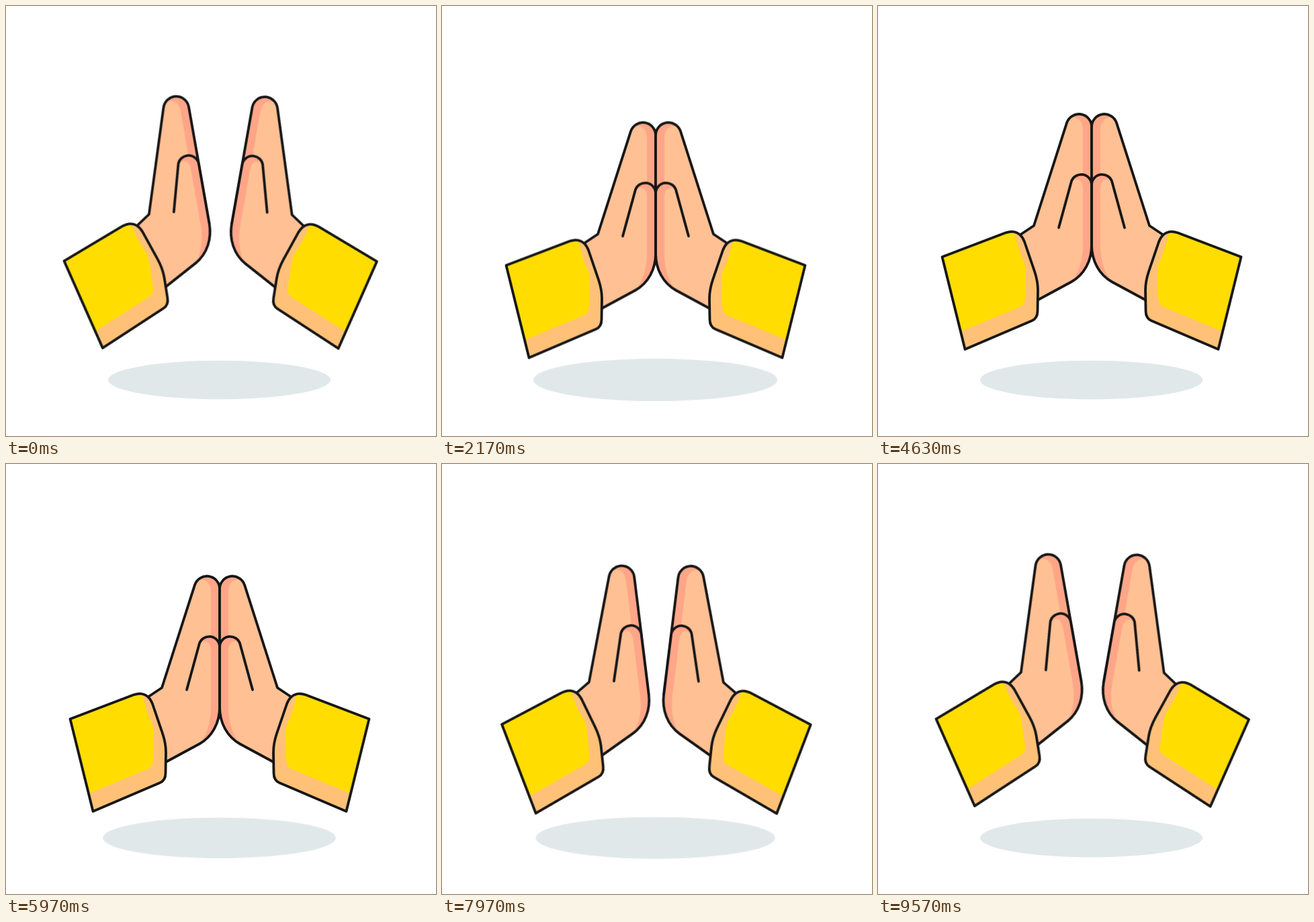
Write an HTML page without scripts that moves like this. It is 640 px wide and 640 px high and loops after 9610 ms.

```html
<!DOCTYPE html>
<html lang="en">
<head>
<meta charset="utf-8">
<title>Praying hands</title>
<style>
  html, body { margin: 0; width: 100%; height: 100%; overflow: hidden; background: #fff; }
  svg { display: block; width: 100%; height: 100%; }

  .skin { fill: #ffc094; }
  .blush { fill: #ffa688; }
  .cuff { fill: #ffc178; }
  .cloth { fill: #ffdd00; }
  .shadow { fill: #e1e8ea; }
  .line { fill: none; stroke: #161616; stroke-width: 3.8; stroke-linecap: round; stroke-linejoin: round; }

  /* Floating: one rise or fall is a quarter of the loop */
  .bob, .shadow { animation: bob 2.4025s cubic-bezier(.35, 0, .65, 1) infinite alternate; }
  .shadow { animation-name: spread; transform-origin: 317.5px 556.5px; }

  /* Hands close, rest together, then open again */
  .left, .right { animation: tilt 9.61s cubic-bezier(.35, 0, .65, 1) infinite; }
  .left { --open: -10deg; transform-origin: 127px 434.1px; }
  .right { --open: 10deg; transform-origin: 506.2px 448.7px; }

  @keyframes bob {
    from { transform: translateY(-6.3px); }
    to { transform: translateY(6.8px); }
  }
  @keyframes spread {
    from { transform: scale(1); }
    to { transform: scale(1.1); }
  }
  @keyframes tilt {
    0%, 87.5%, 100% { transform: rotate(var(--open)); }
    12.5%, 75% { transform: rotate(0deg); }
  }
</style>
</head>
<body>
<svg viewBox="0 0 640 640">
  <defs>
    <path id="palm" d="M212.5 346 L232 333 L280.9 180.2 A19 19 0 0 1 318 186 V362 C318 385 307 406 288 416.5 L238 443.5"/>
    <path id="sleeve" d="M95.5 379.5 L190 343.5 C203 339 213 344 218 357 L233 401 C236 410 238 421 238 429 L237.5 460 C237.5 467 235 472 229 474.5 L129.5 517 Z"/>
    <g id="hand">
      <use href="#palm" class="blush"/>
      <path class="skin" d="M200 354 L232 333 L281 180 C283 175 287 172 291 172 C300 172 305 180 305 190 V362 C305 385 298 405 288 416.5 L225 450 Z"/>
      <path class="blush" d="M287.5 268.4 A15.5 15.5 0 0 1 318 272.5 V362 C318 385 307 406 288 416.5 Z"/>
      <path class="skin" d="M284 282 L288 268 C290 265 292 264 295 264 C302 264 305 270 305 278 V362 C305 385 298 405 288 416.5 L284 418 Z"/>
      <use href="#palm" class="line"/>
      <path class="line" d="M269 336 L287.5 268.4 A15.5 15.5 0 0 1 318 272.5 V362"/>
      <use href="#sleeve" class="cuff"/>
      <path class="cloth" d="M95.5 379.5 L190 343.5 C196 341.5 200 342 204 345 C207 360 211 374 217 386 C220 393 220 400 220 408 L219 440 C219 447 216 452 210 454.5 L123 490.5 Z"/>
      <use href="#sleeve" class="line"/>
    </g>
  </defs>

  <ellipse class="shadow" cx="317.5" cy="556.5" rx="165.5" ry="28.8"/>
  <g class="bob">
    <g class="left"><use href="#hand"/></g>
    <g class="right"><use href="#hand" transform="translate(636) scale(-1 1)"/></g>
  </g>
</svg>
</body>
</html>
```
